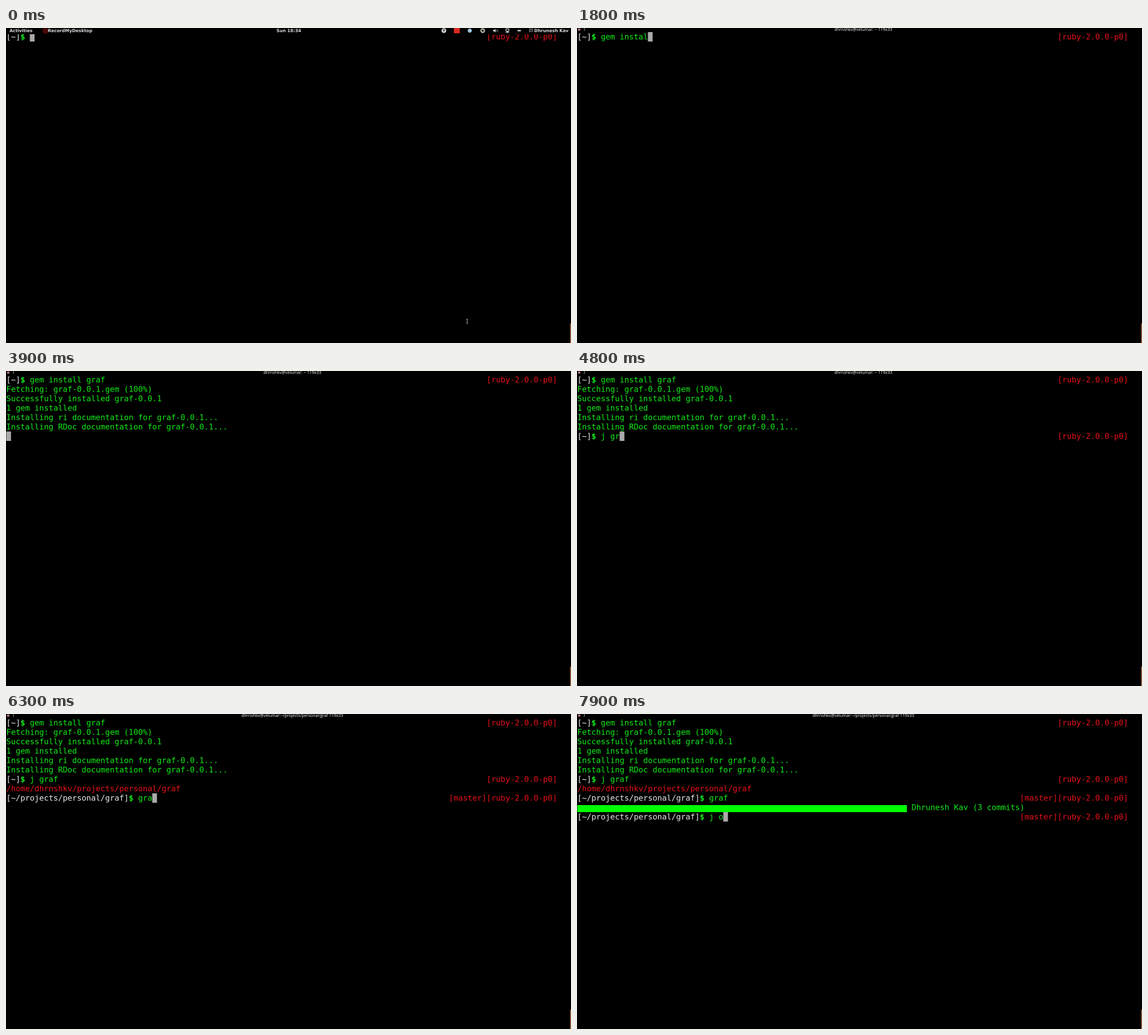
Write an HTML page with a canvas that moves like this. It is 960 px wide and 536 px high and loops after 8000 ms.

```html
<!DOCTYPE html>
<html>
<head>
<meta charset="utf-8">
<style>
  html, body { margin: 0; width: 100%; height: 100%; overflow: hidden; background: #000; }
  canvas { display: block; width: 960px; height: 536px; }
</style>
</head>
<body>
<canvas id="stage" width="1920" height="1072"></canvas>
<script>
// Drawn at double size and shown at half, which gives soft, evenly scaled text
const ctx = document.getElementById('stage').getContext('2d');
ctx.scale(2, 2);

const LOOP = 8000, CELL = 8, ROW = 16, LEFT = 0.5, TOP = 7, BASELINE = 12.5;
const GREEN = '#12ee18', RED = '#ea101a', WHITE = '#ececec', GREY = '#aaaaaa';
const MONO = '13.33px "DejaVu Sans Mono", monospace';
const USER = 'dhrnshkv', PERSON = 'Dhrunesh Kav', DIR = '~/projects/personal/graf';
const RUBY = '[ruby-2.0.0-p0]';

// Prompts: when each appears, and when each character of the command is typed
const commands = [
  { at: 0, row: 0, dir: '~', info: RUBY, text: 'gem install graf',
    keys: [400, 600, 800, 1000, 1100, 1300, 1400, 1600, 1700, 1800, 2000, 2200, 2300, 2400, 2400, 2600] },
  { at: 4000, row: 6, dir: '~', info: RUBY, text: 'j graf',
    keys: [4500, 4600, 4700, 4800, 4900, 5000] },
  { at: 5600, row: 8, dir: DIR, info: '[master]' + RUBY, text: 'graf',
    keys: [5900, 6200, 6300, 6400] },
  { at: 6900, row: 10, dir: DIR, info: '[master]' + RUBY, text: 'j o',
    keys: [7500, 7600, 7800] },
];

// Program output: time, row, column, text, colour
const output = [
  [3400, 1, 0, 'Fetching: graf-0.0.1.gem (100%)', GREEN],
  [3500, 2, 0, 'Successfully installed graf-0.0.1', GREEN],
  [3500, 3, 0, '1 gem installed', GREEN],
  [3700, 4, 0, 'Installing ri documentation for graf-0.0.1...', GREEN],
  [3800, 5, 0, 'Installing RDoc documentation for graf-0.0.1...', GREEN],
  [5400, 7, 0, `/home/${USER}/projects/personal/graf`, RED],
  [6600, 9, 71, PERSON + ' (3 commits)', GREEN],
];

// Window titles; the third item names the text whose left edge is kept
const home = `${USER}@velumar: ~ 119x33`;
const project = `${USER}@velumar:${DIR} 119x33`;
const titles = [
  [100, home], [2800, 'gem install graf 119x33'], [3900, home],
  [5200, 'j graf 119x33'], [5500, project, 'j graf 119x33'], [5600, project],
  [6500, 'graf 119x33'], [6700, project],
];

// Cursor stops: time, column, row
const stops = [[2800, 0, 1], [5200, 0, 7], [6500, 0, 9]];
for (const [at, row] of output) stops.push([at, 0, row + 1]);
for (const c of commands) {
  const start = c.dir.length + 4;
  stops.push([c.at, start, c.row]);
  c.keys.forEach((at, i) => stops.push([at, start + i + 1, c.row]));
}
stops.sort((a, b) => a[0] - b[0]);

const latest = (list, t) => list.filter(item => item[0] <= t).pop();

function rect(x, y, w, h, color) {
  ctx.fillStyle = color;
  ctx.fillRect(x, y, w, h);
}

function dot(x, y, r, color) {
  ctx.fillStyle = color;
  ctx.beginPath();
  ctx.arc(x, y, r, 0, Math.PI * 2);
  ctx.fill();
}

function label(text, x, y, font, color) {
  ctx.font = font;
  ctx.fillStyle = color;
  ctx.fillText(text, x, y);
}

// Terminal text sits on a grid, one character per cell
function cells(text, col, row, color, weight = '') {
  [...text].forEach((char, i) =>
    label(char, LEFT + (col + i) * CELL, TOP + row * ROW + BASELINE, weight + MONO, color));
}

function drawCommand(c, t) {
  const len = c.dir.length;
  cells(`[${c.dir}]`, 0, c.row, WHITE);
  cells('$', len + 2, c.row, GREEN, 'bold ');
  cells(c.text.slice(0, c.keys.filter(at => at <= t).length), len + 4, c.row, GREEN);
  cells(c.info, 117 - c.info.length, c.row, RED);
}

function drawTitle(t) {
  const [, text, anchor = text] = latest(titles, t);
  ctx.font = '7.12px "Open Sans", sans-serif';
  const x = 486.5 - ctx.measureText(anchor).width / 2;
  label(text, x, 5, ctx.font, '#f4f4f4');
  rect(2, 1, 3.5, 3.5, '#c08080');
  rect(12, 0, 1, 5, '#888');
}

function drawPanel() {
  const font = 'bold 7.4px "DejaVu Sans", sans-serif', ink = '#dcdcdc';
  rect(0, 0, 960, 10.5, '#000');
  dot(67, 5, 5, '#4a0808');
  label('Activities', 6, 7, font, ink);
  label('RecordMyDesktop', 71, 7, font, ink);
  label('Sun 18:34', 459.5, 7, font, ink);
  label(PERSON, 897.5, 7, font, ink);

  dot(744, 4.5, 4, ink);
  rect(742, 3, 4, 1, '#222');
  rect(743.5, 2, 1, 5, '#222');
  rect(761, 0, 10, 9, '#d92a20');
  dot(788, 4.5, 3.5, '#9cc4dc');
  dot(810, 4.5, 4, '#b8b8a8');
  dot(810, 4.5, 1.8, '#111');
  // Speaker
  rect(828, 3, 2, 3, ink);
  ctx.beginPath();
  ctx.moveTo(829, 4.5);
  ctx.lineTo(832, 1.5);
  ctx.lineTo(832, 7.5);
  ctx.fill();
  rect(833, 3, 1, 3, '#999');
  rect(835, 2, 1, 5, '#666');
  // Network, battery, chat
  rect(849, 1, 6, 5, ink);
  rect(850, 2, 4, 3, '#111');
  rect(851, 6, 2, 1, ink);
  rect(849, 7, 6, 1, ink);
  rect(869, 3, 6, 3, '#888');
  rect(870, 4, 4, 1, ink);
  rect(889, 1, 6, 5, '#777');
  rect(890, 2, 4, 3, '#222');
  rect(889, 6, 2, 1, '#777');
}

function drawPointer() {
  rect(783, 495, 1, 8, '#aaa');
  rect(782, 495, 3, 1, '#888');
  rect(782, 502, 3, 1, '#888');
}

function draw(t) {
  rect(0, 0, 960, 536, '#000');
  commands.filter(c => c.at <= t).forEach(c => drawCommand(c, t));
  for (const [at, row, col, text, color] of output)
    if (at <= t) cells(text, col, row, color);
  if (t >= 6600) rect(LEFT, TOP + 9 * ROW + 4, 70 * CELL, 12, '#00ff00');

  const blinkedOff = t >= 3000 && t < 3400;
  const [, col, row] = latest(stops, t);
  if (!blinkedOff) rect(LEFT + col * CELL, TOP + row * ROW, CELL, ROW, GREY);

  if (t < 100) drawPanel(); else drawTitle(t);
  if (t < 500) drawPointer();
  rect(958.5, 503, 1.5, 33, '#a8623c');
}

function tick(now) {
  draw(now % LOOP);
  requestAnimationFrame(tick);
}
requestAnimationFrame(tick);
</script>
</body>
</html>
```
